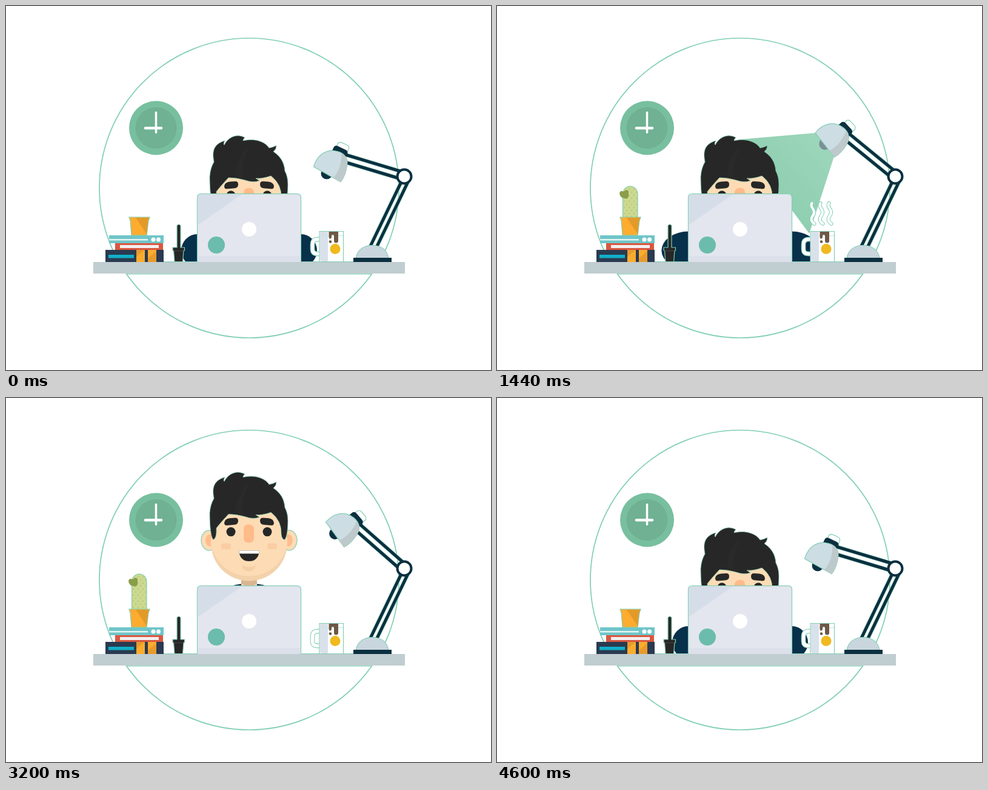
Animation of 800x600 px, one loop 4.64 s. Source, as an HTML page:

```html
<!DOCTYPE html>
<html lang="en">
<head>
<meta charset="utf-8">
<title>Desk worker</title>
<style>
  html, body { margin: 0; width: 100%; height: 100%; overflow: hidden; background: #fff; }
  svg { display: block; width: 100%; height: 100%; }
  .edge { stroke: #82cfb4; stroke-width: 1.2; }
  .navy { fill: #0b3040; }
  .halo { stroke: #a5dcc8; stroke-width: 6.6; }
  .rod { stroke: #0b3040; stroke-width: 5; }
  .ink { fill: #272727; }
  .skin { fill: #fddcb5; }
  .blush { fill: #fbcda4; }
  .white { fill: #fff; }
</style>
</head>
<body>
<svg viewBox="0 0 800 600">
  <defs>
    <clipPath id="aboveDesk"><rect width="800" height="422"/></clipPath>
    <clipPath id="abovePot"><rect width="800" height="349"/></clipPath>
    <clipPath id="faceClip"><circle cx="401" cy="239" r="63"/></clipPath>
    <linearGradient id="glow" x1="1" y1="0" x2="0" y2="1">
      <stop offset="0" stop-color="#9fd7bd"/><stop offset="1" stop-color="#86caa9"/>
    </linearGradient>
    <pattern id="spots" width="8" height="10" patternUnits="userSpaceOnUse">
      <circle cx="2" cy="2" r="1.400" fill="#bccb7e"/><circle cx="6" cy="7" r="1.400" fill="#bccb7e"/>
    </pattern>
    <path id="wisp" pathLength="100" d="M523.500 319.500q-8 8-3 14t0 13t3 12.500"/>
    <path id="brow" d="M360 206Q361 199 370 198.500L379 198Q383 198.500 383 203Q383 209 376 209.500L364 210.500Q360 210.500 360 206Z"/>
    <path id="lowerArm" d="M652 290L600 398M663 290L611 398"/>
    <path id="upperArm" d="M558 244.500L651 272.500M558 257L648 284"/>
  </defs>

  <circle class="edge" cx="401" cy="300" r="247" fill="#fff" style="stroke-width:1.7"/>

  <!-- clock -->
  <circle cx="247.500" cy="201" r="44.500" fill="#78bf9f"/>
  <circle cx="247.500" cy="201" r="34" fill="#6fb192"/>
  <g stroke="#fff" stroke-linecap="round">
    <path d="M247.500 175.500V208.500" stroke-width="3.500"/>
    <path d="M230 201.300H256" stroke-width="4.500"/>
  </g>

  <path id="beam" d="M400 220L527 209L556 248L515 375Z" fill="url(#glow)"/>

  <!-- lamp -->
  <use href="#lowerArm" class="halo"/>
  <use href="#lowerArm" class="rod"/>
  <g id="lamp">
    <use href="#upperArm" class="halo"/>
    <use href="#upperArm" class="rod"/>
    <rect class="white edge" x="545" y="226.500" width="20" height="16" rx="5" transform="rotate(25 555 234)"/>
    <rect class="navy" x="538" y="233" width="25" height="16" rx="5" transform="rotate(25 550 241)"/>
    <circle id="bulb" class="navy" cx="529" cy="276" r="9.500"/>
    <path class="edge" d="M507.500 265C513 246 527 237 541 238.500C556 240 565 249 562.500 263C561 275 556 285 552 290Z" fill="#cddde4"/>
    <path d="M540 283.500C550 272 554 257 553 242C562 247 564 255 562.500 263C561 275 556 285 552 290Z" fill="#bec9cc"/>
  </g>
  <circle cx="657" cy="281" r="11.500" fill="#fff" stroke="#0b3040" stroke-width="4"/>
  <path class="edge" d="M577 416C579 401 591 394.500 604 394.500S629 401 631 416Z" fill="#c9d6de"/>
  <rect class="navy" x="573" y="415" width="63" height="7"/>

  <!-- person -->
  <g clip-path="url(#aboveDesk)">
    <g fill="#07304a">
      <ellipse id="armL" cx="316" cy="403"/>
      <ellipse id="armR" cx="486" cy="403"/>
    </g>
    <g id="head">
      <ellipse cx="401" cy="363" rx="77" ry="57" fill="#07304a"/>
      <path class="skin" d="M388 290H414V325H388Z"/>
      <path d="M388 290H414V311Q401 318 388 311Z" fill="#d9b591" transform="translate(0 -4)"/>
      <ellipse class="skin edge" cx="335" cy="235" rx="13" ry="16.500"/>
      <ellipse class="skin edge" cx="467" cy="235" rx="13" ry="16.500"/>
      <ellipse cx="337" cy="235" rx="8" ry="10" fill="#ffbd8e"/>
      <ellipse cx="465" cy="235" rx="8" ry="10" fill="#ffbd8e"/>
      <circle cx="401" cy="239" r="63" fill="#f3d2ab"/>
      <circle class="skin" cx="401" cy="230" r="64" clip-path="url(#faceClip)"/>
      <rect class="blush" x="355" y="240" width="16" height="10" rx="4"/>
      <rect class="blush" x="431" y="240" width="16" height="10" rx="4"/>
      <path d="M389 275Q401 283 412 275Q411 286 401 286.500Q390 286 389 275Z" fill="#f5cfa5"/>
      <rect x="392" y="209" width="17" height="30" rx="7" fill="#ffbb8a"/>
      <g class="ink">
        <use href="#brow"/>
        <use href="#brow" transform="matrix(-1 0 0 1 802 0)"/>
        <circle cx="371" cy="221" r="7.500"/>
        <circle cx="431" cy="221" r="7.500"/>
        <circle id="pout" cx="401" cy="263" r="6"/>
        <path class="edge" style="stroke-width:.8" d="M342 234C337 229 336 205 336 190Q337 176 343 166C340 150 341 137 361 131Q358 136 360 138C367 124 382 119 394 126Q391 128 391 131C408 127 426 131 434 143Q440 142 446 139Q446 145 441 149C453 157 459 167 460 181Q465 190 465 203Q465 226 460 234Q455 234 454 225Q455 203 437 189Q423 194 412 193Q415 195 418 197Q408 201 394 196Q380 192 367 192Q353 207 347 215Q348 231 342 234Z"/>
      </g>
      <path d="M380 188Q377 161 404 138Q387 165 391 193Z" fill="#2b2a2a"/>
      <g id="smile">
        <path class="ink" d="M384 252H418Q416 269.500 401 269.500T384 252Z"/>
        <path class="white" d="M384 252H418L417 257H385Z"/>
      </g>
    </g>
  </g>

  <!-- laptop -->
  <path class="edge" d="M315.500 422V316Q315.500 309.700 322 309.700H480Q486.500 309.700 486.500 316V422Z" fill="#e3e6ee"/>
  <path d="M316.500 361V316Q316.500 310.500 322 310.500H389Z" fill="#d5dde8"/>
  <rect x="317" y="412" width="169" height="10" fill="#dce0ea"/>
  <circle class="white" cx="401" cy="368" r="12"/>
  <circle cx="347" cy="394" r="14" fill="#6bbcad"/>

  <!-- books -->
  <rect x="164" y="402" width="96" height="20" fill="#2a3a50"/>
  <rect x="169" y="410" width="42" height="5.500" fill="#11b0c9"/>
  <path d="M215 402H229V422H215ZM234 402H248V422H234Z" fill="#fbac2f"/>
  <path d="M215 402H229L215 413ZM248 404V422H234V416Z" fill="#e89b2b"/>
  <rect x="180" y="391" width="79" height="11" fill="#d9573f"/>
  <rect x="188" y="394" width="64" height="5" fill="#f5eeee"/>
  <rect x="170" y="378" width="90" height="13" fill="#6fc5c8"/>
  <rect x="170" y="384" width="64" height="2.500" fill="#e5f5f3"/>
  <circle class="white" cx="243" cy="385" r="3.500"/>
  <circle class="white" cx="251.500" cy="385" r="3.500"/>

  <!-- cactus -->
  <g clip-path="url(#abovePot)">
    <g id="cactus">
      <path class="edge" d="M207.500 378V309A12.300 13 0 0 1 232 309V378Z" fill="#ccd990"/>
      <path d="M209 378V309A11 12 0 0 1 231 309V378Z" fill="url(#spots)"/>
      <path d="M202 309Q203 303 209 306Q213 301 217 305V314Q215 319 210 317Q203 316 202 309Z" fill="#8a9e4a"/>
    </g>
  </g>
  <path class="edge" d="M203 348H237L235 354L232 378H207L205 354Z" fill="#fdac30"/>
  <path d="M214 349H236L234 355L232 376Z" fill="#e49a28"/>

  <!-- pen pot -->
  <path class="ink edge" d="M282 398V362Q285 358 288 362V398H294.500V403H293L291.500 422H278L276.500 403H275V398Z"/>
  <path d="M276 403.500H293" stroke="#454545"/>

  <!-- mug -->
  <g fill="none">
    <path id="handle" d="M518 384.500H514Q505.500 384.500 505.500 393V401Q505.500 408.500 514 408.500H518" stroke="#82cfb4" stroke-width="7.400"/>
    <use href="#handle" class="handleFill"/>
    <path d="M518 384.500H514Q505.500 384.500 505.500 393V401Q505.500 408.500 514 408.500H518" stroke="#fff" stroke-width="5.600"/>
  </g>
  <path class="white edge" d="M517 371.500H556.500V422H517Z"/>
  <path d="M517.500 372H531V422H524Q517.500 422 517.500 415Z" fill="#d9e1ea"/>
  <path d="M517 378.500H556" stroke="#bfe6e2"/>
  <path d="M532.500 372H548V387Q548 390.500 544.500 390.500T541 387V379Q541 377 539 377T537 379V381Q537 383.500 534.700 383.500T532.500 381Z" fill="#6e5846"/>
  <circle cx="535" cy="388.500" r="2.300" fill="#6e5846"/>
  <circle cx="543" cy="400.500" r="8.500" fill="#f0b91f"/>

  <g id="steam" fill="none" stroke-linecap="round">
    <g stroke="#82cfb4" stroke-width="6"><use href="#wisp"/><use href="#wisp" x="14"/><use href="#wisp" x="28"/></g>
    <g stroke="#fff" stroke-width="4"><use href="#wisp"/><use href="#wisp" x="14"/><use href="#wisp" x="28"/></g>
  </g>

  <!-- desk -->
  <path class="edge" d="M260 421.500H316M486 421.500H573"/>
  <rect x="144" y="422" width="514" height="19" fill="#c0cdd1"/>
  <path class="edge" d="M198 441.800H604"/>
</svg>

<script>
const LOOP = 4640, STEP = 40;
const el = id => document.getElementById(id);
const set = (id, attrs) => { for (const k in attrs) el(id).setAttribute(k, attrs[k]); };
const show = (id, on) => set(id, { visibility: on ? 'visible' : 'hidden' });

const span = (t, from, to) => Math.min(1, Math.max(0, (t - from) / (to - from)));
const backIn = (x, s) => x * x * ((s + 1) * x - s);
const backOut = (x, s) => 1 - backIn(1 - x, s);

// 1 while raised: springs up over [a, b], winds up and drops over [c, d]
const raised = (t, [a, b, c, d], s) =>
  t < c ? backOut(span(t, a, b), s) : 1 - backIn(span(t, c, d), s);

// piecewise linear track of time, value pairs
function track(t, ...keys) {
  let i = 0;
  while (i < keys.length - 4 && t >= keys[i + 2]) i += 2;
  const [t0, v0, t1, v1] = keys.slice(i, i + 4);
  return v0 + (v1 - v0) * span(t, t0, t1);
}

function drawSteam(t) {
  const local = (t < 2400 ? t : t - 2480) - 1100;
  const top = 100 - 100 * span(local, 0, 400);
  const bottom = 100 - 100 * span(local, 600, 1000);
  show('steam', bottom - top > 0);
  set('wisp', { 'stroke-dasharray': `${Math.max(0, bottom - top)} 300`, 'stroke-dashoffset': -top });
}

function draw(t) {
  const lift = raised(t, [2560, 3230, 3880, 4450], 2.4);
  set('head', { transform: `translate(0 ${91 * (1 - lift)})` });

  const reach = track(t, 0, 27, 1040, 42, 1960, 48, 2280, 48, 2520, 0, 4300, 0, 4500, 27, LOOP, 27);
  const arm = { rx: reach, ry: Math.min(reach, 24 + reach / 6) };
  set('armL', arm);
  set('armR', arm);

  const grin = 1 - span(t, 3560, 3720);
  const smiling = t > 2300 && grin > 0;
  show('smile', smiling);
  show('pout', !smiling);
  set('smile', { transform: `translate(401 262) scale(${0.35 + 0.65 * grin} ${0.7 + 0.3 * grin}) translate(-401 -262)` });

  const tilt = 22.5 * raised(t, [160, 800, 3000, 3600], 1.7);
  set('lamp', { transform: `rotate(${tilt} 657 281)` });
  const lit = t >= 840 && t < 1640;
  show('beam', lit);
  el('bulb').style.fill = lit ? '#7c8f95' : '';

  const grown = raised(t, [280, 920, 3000, 3600], 2.2);
  set('cactus', { transform: `translate(0 ${56 * (1 - grown)})` });

  drawSteam(t);
}

const start = performance.now();
function tick() {
  const t = (performance.now() - start) % LOOP;
  draw(Math.floor(t / STEP) * STEP);
  requestAnimationFrame(tick);
}
tick();
</script>
</body>
</html>
```
